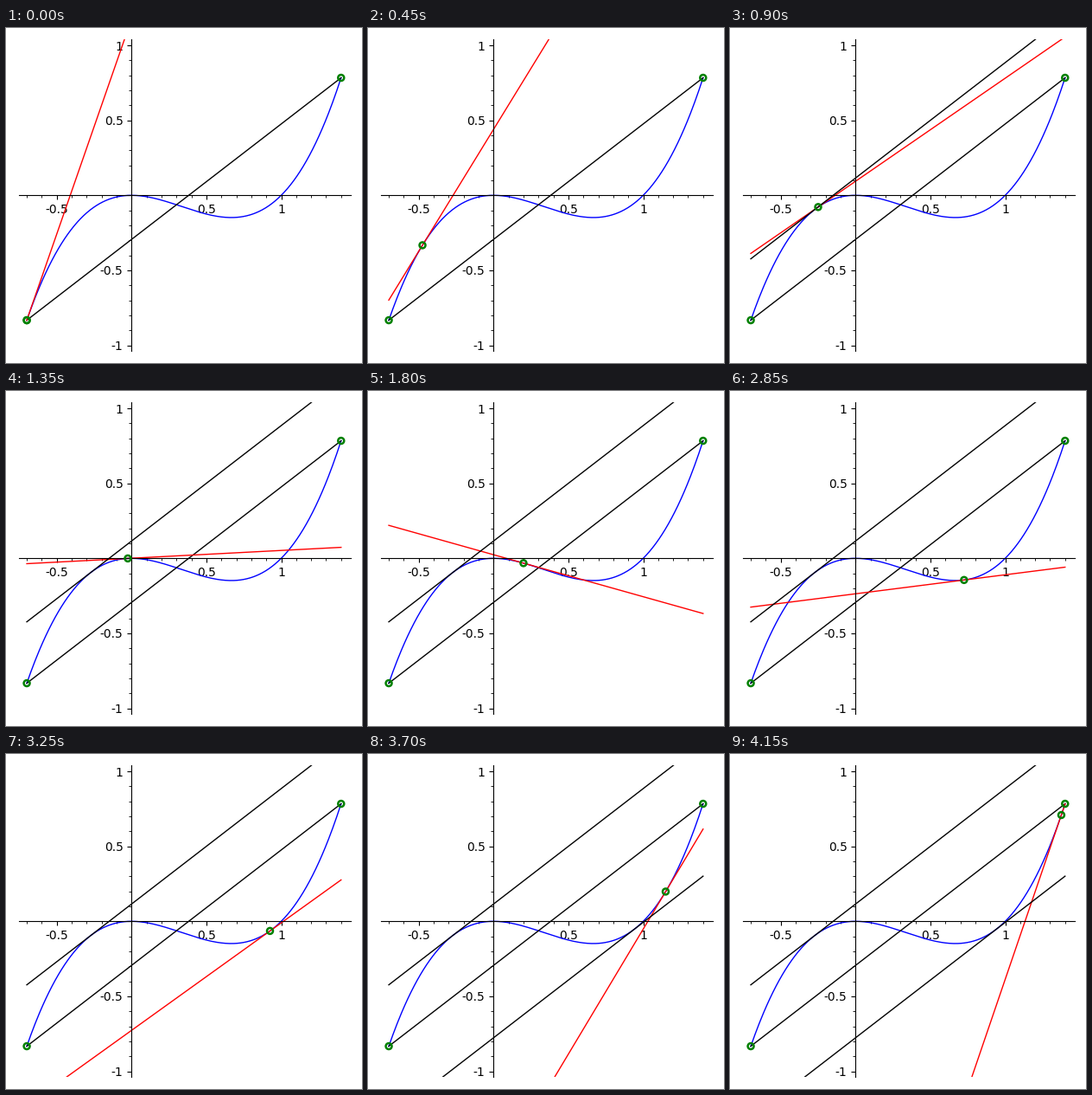
Write a matplotlib script that moves like this. It is 412x387 px and loops after 4.2 s.

```python
import numpy as np
import matplotlib.pyplot as plt
from matplotlib.animation import FuncAnimation
from matplotlib.ticker import AutoMinorLocator, FuncFormatter, MultipleLocator

W, H, DPI = 412, 387, 100
FRAMES, INTERVAL = 84, 50
A, B = -0.7, 1.4
UNIT = 173.2            # pixels per data unit
OX, OY = 145.3, 193.3   # pixel position of the origin
LEFT, RIGHT, TOP, BOTTOM = 14.5, 399.0, 13.2, 373.4

plt.rcParams["font.family"] = "DejaVu Sans"


def f(x):
    return x**3 - x**2


def df(x):
    return 3 * x**2 - 2 * x


ends = np.array([A, B])
secant = (f(B) - f(A)) / (B - A)
# Points where the tangent is parallel to the chord
means = np.sort(np.roots([3, -2, -secant]))


def tangent(c):
    return f(c) + df(c) * (ends - c)


fig = plt.figure(figsize=(W / DPI, H / DPI), dpi=DPI, facecolor="white")
ax = fig.add_axes([LEFT / W, 1 - BOTTOM / H, (RIGHT - LEFT) / W, (BOTTOM - TOP) / H])
ax.set_xlim((LEFT - OX) / UNIT, (RIGHT - OX) / UNIT)
ax.set_ylim((OY - BOTTOM) / UNIT, (OY - TOP) / UNIT)

for side in ("left", "bottom"):
    ax.spines[side].set_position("zero")
for side in ("right", "top"):
    ax.spines[side].set_visible(False)
for axis in (ax.xaxis, ax.yaxis):
    axis.set_major_locator(MultipleLocator(0.5))
    axis.set_minor_locator(AutoMinorLocator(5))
    axis.set_major_formatter(
        FuncFormatter(lambda v, _: "" if abs(v) < 1e-9 else f"{v:g}"))


def line(x, y, color):
    return ax.plot(x, y, color=color, lw=1)[0]


xs = np.linspace(A, B, 300)
line(xs, f(xs), "blue")
line(ends, f(ends), "black")
moving = line(ends, tangent(A), "red")
parallels = [line(ends, tangent(c), "black") for c in means]
dots = ax.scatter([A, B, A], f(np.array([A, B, A])), s=25, facecolors="none",
                  edgecolors="green", linewidths=1.8, zorder=5)


def update(i):
    x = A + (B - A) * i / FRAMES
    moving.set_ydata(tangent(x))
    for par, c in zip(parallels, means):
        par.set_visible(x >= c)
    px = np.array([A, B, x])
    dots.set_offsets(np.column_stack([px, f(px)]))
    return [moving, dots, *parallels]


anim = FuncAnimation(fig, update, frames=FRAMES, interval=INTERVAL, repeat=True)
plt.show()
```
